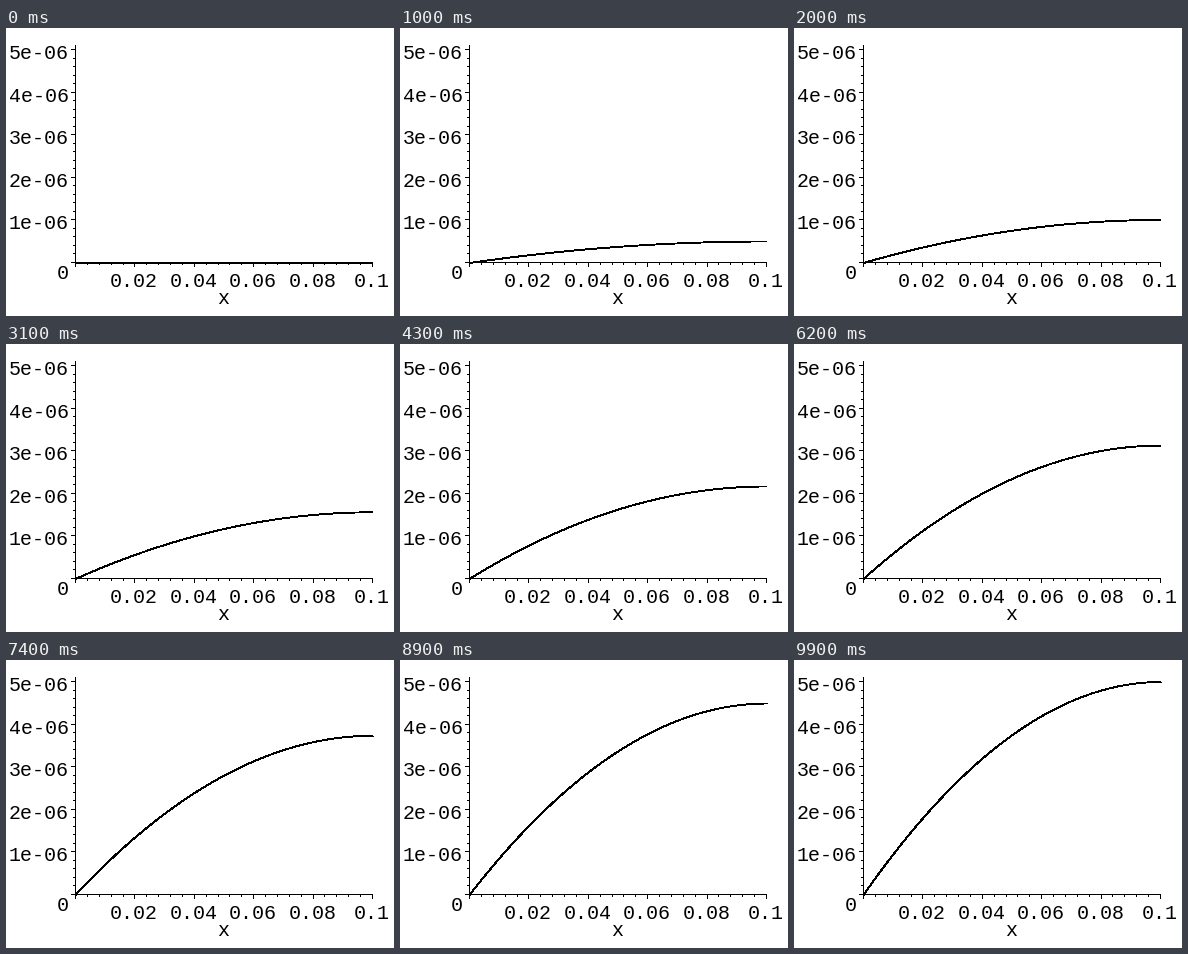
Recreate the animation shown at these times as a matplotlib script. Size 388 by 288 pixels, loop 10000 ms.

```python
import numpy as np
import matplotlib.pyplot as plt
from matplotlib.animation import FuncAnimation
from matplotlib.collections import LineCollection

W, H, DPI = 388, 288, 100
PX = 72 / DPI
FRAMES = 100
LEFT, RIGHT, BASE, TOP = 69, 366, 234, 21

fig = plt.figure(figsize=(W / DPI, H / DPI), dpi=DPI, facecolor="white")
ax = fig.add_axes([0, 0, 1, 1])
ax.set(xlim=(0, W), ylim=(H, 0))
ax.axis("off")

rules = []


def rule(x0, y0, x1, y1):
    rules.append([(x0, y0), (x1, y1)])


def write(text, x, baseline, align="center"):
    ax.text(x, baseline, text, family="Liberation Mono", size=20 * PX,
            color="black", ha=align, va="baseline")


# Axes
rule(LEFT + 0.5, 17, LEFT + 0.5, BASE + 1)
rule(LEFT, BASE + 0.5, RIGHT + 1, BASE + 0.5)

# Ticks: every fifth one is long and labelled
for i in range(26):
    major = i % 5 == 0
    size = 5 if major else 3
    x = round(LEFT + (RIGHT - LEFT) * i / 25)
    y = round(BASE - (BASE - TOP) * i / 25)
    rule(x + 0.5, BASE, x + 0.5, BASE + size)
    rule(LEFT + 1 - size, y + 0.5, LEFT + 1, y + 0.5)
    if major and i:
        write(f"{i / 250:g}", x, 259)
        write(f"{i // 5}e-06", 3, y + 10, "left")

write("0", 57, 251)
write("x", 217, 276)

ax.add_collection(LineCollection(rules, colors="black", linewidths=PX,
                                 capstyle="butt", snap=False))

# Aliased strokes fill every pixel they touch, so this shows two pixels wide
curve, = ax.plot([], [], color="black", lw=0.9 * PX, antialiased=False,
                 solid_capstyle="butt", snap=False)

u = np.linspace(0, 1, 120)
xs = LEFT + 0.5 + (RIGHT + 0.5 - LEFT) * u
shape = 2 * u - u ** 2


def update(n):
    curve.set_data(xs, BASE + 1 - (BASE - TOP) * shape * n / (FRAMES - 1))
    return curve,


anim = FuncAnimation(fig, update, frames=FRAMES, interval=100, repeat=True,
                     repeat_delay=0, blit=False)
plt.show()
```
